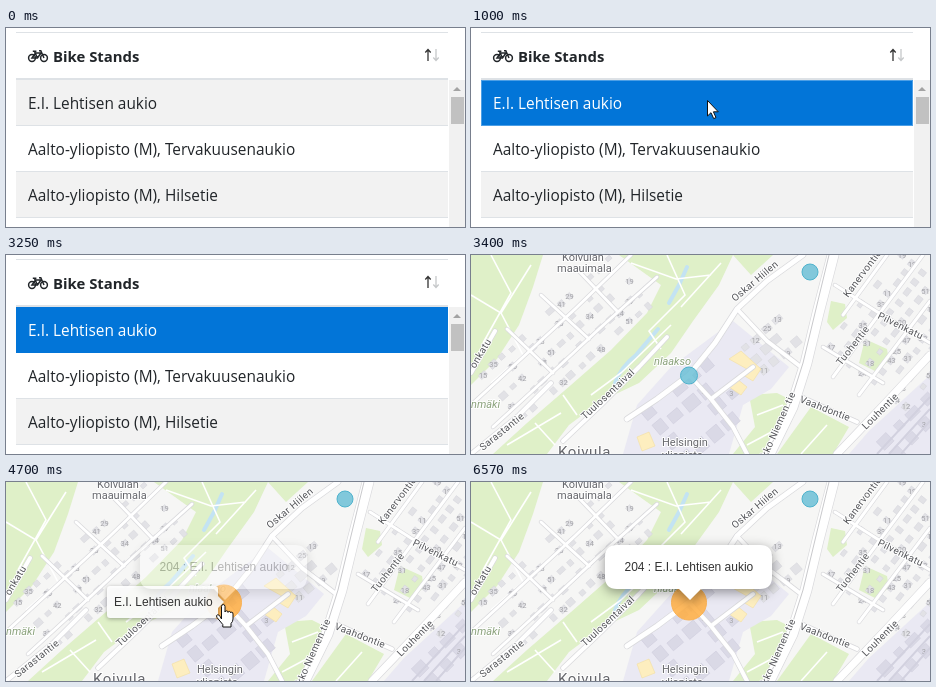
These frames come from a looping animation (459 by 199 pixels, 7270 ms). An HTML page:

```html
<!DOCTYPE html>
<html lang="fi">
<head>
<meta charset="utf-8">
<title>Bike stands</title>
<style>
html, body { margin: 0; width: 100%; height: 100%; overflow: hidden; background: #fff; }
svg { display: block; position: absolute; left: 0; top: 0; }
#list text { font: 15.4px "Open Sans", "Noto Sans", sans-serif; fill: #212529; }
#list .head { font-size: 14.9px; font-weight: 700; }
#picked text { fill: #fff; }
.green { fill: #dff0c8; }
.campus { fill: #eae9f3; }
.yellow { fill: #fdeebf; stroke: #f3dfa2; stroke-width: .6; }
.water { fill: none; stroke: #c3e3f3; stroke-width: 4; stroke-linecap: round; }
.trail { fill: none; stroke: #fff; stroke-width: 1.6; }
.casing, .road { fill: none; stroke-linejoin: round; stroke-linecap: round; }
.casing { stroke: #d9d9dc; }
.road { stroke: #fff; }
.house { fill: #e2e2e6; stroke: #d4d4da; stroke-width: .5; }
.block { fill: #dad9e6; stroke: #cbcada; stroke-width: .5; }
.num { font: 7.5px Roboto, sans-serif; fill: #a3a3a8; }
.street { font: 10px Roboto, Lato, sans-serif; letter-spacing: .3px; fill: #55565a; }
.place { font: 11px Roboto, Lato, sans-serif; fill: #66676c; }
.big { font-size: 15px; letter-spacing: .6px; }
.nature { font-style: italic; fill: #8ba27c; }
.street, .place { stroke: #fff; stroke-width: 2px; stroke-linejoin: round; paint-order: stroke; }
.tip text { font: 12px "Liberation Sans", Arial, sans-serif; fill: #333; }
#label { filter: drop-shadow(0 1px 2px rgba(0,0,0,.35)); }
#popup { filter: drop-shadow(0 3px 6px rgba(0,0,0,.4)); }
</style>
</head>
<body>
<svg width="459" height="199" viewBox="0 0 459 199">
  <g id="list">
    <rect width="459" height="199" fill="#fff"/>
    <path d="M10 52h432v45H10zM10 144h432v45H10z" fill="#f2f2f2"/>
    <path d="M10 4.5h432M10 97.5h432M10 143.5h432M10 189.5h432" stroke="#dee2e6"/>
    <path d="M10 51h432" stroke="#dee2e6" stroke-width="2"/>
    <g fill="none" stroke="#212529" stroke-width="1.5">
      <circle cx="26" cy="30" r="3.4"/><circle cx="38" cy="30" r="3.4"/>
      <path d="M26 30l3.5-5h5.5l-3.5 5zM33 22.8h1.8L38 30M31.5 30l-3-6.5M26.8 23.3h3.6"/>
    </g>
    <text class="head" x="47" y="34">Bike Stands</text>
    <g fill="none" stroke-width="1.3">
      <path d="M422 33V21.5M419.3 24.5l2.7-3 2.7 3" stroke="#333"/>
      <path d="M430 21v11.5M427.3 29.5l2.7 3 2.7-3" stroke="#c6c8ca"/>
    </g>
    <text id="first" x="22" y="81">E.I. Lehtisen aukio</text>
    <text x="22" y="127">Aalto-yliopisto (M), Tervakuusenaukio</text>
    <text x="22" y="173">Aalto-yliopisto (M), Hilsetie</text>
    <g id="picked">
      <rect x="10" y="52" width="432" height="46" fill="#0275d8"/>
      <rect id="focus" x="10.5" y="52.5" width="431" height="45" fill="none" stroke="#4c9fe6"/>
      <text x="22" y="81">E.I. Lehtisen aukio</text>
    </g>
    <path d="M443 52h16v147h-16z" fill="#f1f1f1"/>
    <path d="M447 63l4-4 4 4z" fill="#a3a3a3"/>
    <path d="M445 69h13v27h-13z" fill="#c1c1c1"/>
  </g>

  <g id="map">
    <rect width="459" height="199" fill="#f6f6f5"/>
    <g class="green">
      <path d="M0 0H72L62 32 48 70 26 104 0 130z"/>
      <path d="M148 0H262L248 30 222 66 200 98 168 128 130 146 98 170 76 199H22L56 168 100 130 140 95 176 58 190 30z"/>
      <path d="M278 140L306 138 322 146 304 186 290 199 262 199 284 172z"/>
      <path d="M340 152L378 172 362 199H306z"/>
      <path d="M360 46l14 3 2 14-14 12-6-8zM394 84l22 10 2 12-14 10-16-8zM262 0h40l-22 20z"/>
    </g>
    <path class="campus" d="M200 112L262 66 318 112 300 134 272 150 258 199H152L166 150z"/>
    <path class="campus" d="M459 120L398 176 378 199H459z"/>
    <path class="water" d="M144 128q6-16 21-28l22-26M198 48l10-18 8-18"/>
    <path class="trail" d="M0 40L30 58 52 100 20 128M20 0L40 38 12 88M60 10L30 58M160 8L205 24 240 20M196 0L214 40 178 76 190 94M250 8L210 52M120 140L150 118 200 70M84 190L64 168M106 160L92 140M286 160L312 150M276 190L306 174M330 199L356 170M36 190L90 158"/>
    <g id="houses"></g>
    <g class="yellow">
      <path d="M258 104l12-8 20 18-8 12-10-6 4-6zM266 124l10 8-6 8-12-8zM166 182l12-5 6 14-13 5z"/>
    </g>
    <g id="roads"></g>
    <path d="M459 142L406 199M459 154L418 199M459 166L430 199" stroke="#d2d1df" stroke-width="2"/>
    <path d="M358 0L344 58 332 108 318 152 296 199" fill="none" stroke="#c9c9cc"/>
    <g id="names"></g>
    <circle cx="339" cy="17" r="8" fill="#6cc0d6" stroke="#4fb3cd" fill-opacity=".85"/>
    <circle id="stand" cx="218" cy="120.5"/>
    <g id="label" class="tip">
      <path d="M104 104H209q3 0 3 3v7l6 6-6 6v7q0 3-3 3H104q-3 0-3-3V107q0-3 3-3z" fill="#fff" fill-opacity=".92"/>
      <text x="108" y="124">E.I. Lehtisen aukio</text>
    </g>
    <g id="popup" class="tip">
      <path d="M146 63H289q12 0 12 12V95q0 12-12 12H230L219 118 208 107H146q-12 0-12-12V75q0-12 12-12z" fill="#fff"/>
      <text x="153.5" y="89">204 : E.I. Lehtisen aukio</text>
    </g>
  </g>

  <path id="arrow" d="M.5 .5V16L4 12.7 6.7 18.6 9 17.6 6.4 11.8H11.3z" fill="#fff" stroke="#111"/>
  <path id="hand" d="M5.5 15V2.5q0-2 1.7-2t1.8 2V8q.3-1.2 1.6-1.2T12 8.4q.3-1 1.4-1t1.4 1.5q.3-.8 1-.8 1.2 0 1.2 2V15q0 2.5-2 4.5V23H6.8V20.5L1 13.5q-1.2-2 .3-2.7 1.5-.5 2.7 1.6z" fill="#fff" stroke="#111"/>
</svg>
<script>
const LOOP = 7270;
const $ = id => document.getElementById(id);

function add(parent, tag, attrs, text) {
  const el = document.createElementNS("http://www.w3.org/2000/svg", tag);
  for (const k in attrs) el.setAttribute(k, attrs[k]);
  if (text) el.textContent = text;
  $(parent).append(el);
}

let seed = 4211;
const rand = () => (seed = seed * 16807 % 2147483647) / 2147483647;

// A turned grid of jittered buildings, some with a house number
function quarter(x, y, deg, cols, rows, dx, dy, size, kind) {
  const a = deg * Math.PI / 180, cos = Math.cos(a), sin = Math.sin(a);
  for (let r = 0; r < rows; r++) for (let c = 0; c < cols; c++) {
    const u = c * dx + rand() * 3, v = r * dy + rand() * 3;
    const px = x + u * cos - v * sin, py = y + u * sin + v * cos;
    const w = size * (.7 + rand() * .5), h = size * (.6 + rand() * .4);
    const skip = rand(), number = rand();
    if (skip < .14) continue;
    const turn = `translate(${px.toFixed(1)} ${py.toFixed(1)}) rotate(${deg})`;
    add("houses", "rect", { class: kind, x: -w / 2, y: -h / 2, width: w, height: h, transform: turn });
    if (number < .38) {
      const n = kind === "block" ? 1 + Math.floor(rand() * 11) : 11 + Math.floor(rand() * 42);
      add("houses", "text", { class: "num", x: px - 4, y: py + 3 }, String(n));
    }
  }
}
quarter(10, 118, -42, 14, 5, 13, 15, 7, "house");
quarter(356, 92, -52, 10, 8, 13, 14, 7, "house");
quarter(272, 92, -40, 4, 3, 14, 15, 9, "house");
quarter(176, 158, -40, 5, 4, 19, 19, 14, "block");
quarter(412, 186, -45, 4, 2, 20, 18, 12, "block");

const roads = [
  [3, "M0 150L50 104 104 54 160 0"],
  [3, "M22 172L70 128 128 74 186 22"],
  [4, "M0 199L48 160 80 128M0 118L24 76"],
  [3, "M36 74L82 118M70 40L118 84M104 12L146 56"],
  [4, "M92 186L130 150 168 112 196 82"],
  [5, "M332 0L296 26 266 54 244 88 218 120 186 144 156 164"],
  [4, "M218 120L240 144 262 172 276 199M266 54L296 86 330 112M240 144L282 112"],
  [3, "M372 60L416 0M362 122L400 70 452 0M388 140L459 46M364 30L408 58 459 88M352 92L412 128"],
  [4, "M324 139L352 152 386 167"],
  [7, "M459 100L420 142 388 176 366 199"],
  [11, "M362 0L347 58 335 108 321 152 298 199"]
];
for (const [w, d] of roads) add("roads", "path", { class: "casing", d, "stroke-width": w + 1.4 });
for (const [w, d] of roads) add("roads", "path", { class: "road", d, "stroke-width": w });

const names = [
  ["street", "Oskar Hiilen", 264, 47, -40],
  ["street", "Kanervontie", 377, 43, -53],
  ["street", "Pilvenkatu", 406, 63, 26],
  ["street", "Tuohentie", 370, 111, -52],
  ["street", "Vaahdontie", 328, 147, 21],
  ["street", "Louhentie", 395, 175, -45],
  ["street", "Sarastantie", 12, 196, -39],
  ["street", "Tuulosentaival", 114, 165, -43],
  ["street", "kko Niemen tie", 296, 203, -66],
  ["street", "onkatu", 4, 114, -59],
  ["place nature", "nmäki", 0, 153, 0],
  ["place nature", "nlaakso", 183, 110, 0],
  ["place", "Koivulan", 91, 6, 0],
  ["place", "maauimala", 86, 17, 0],
  ["place", "Helsingin", 191, 191, 0],
  ["place", "yliopisto", 191, 204, 0],
  ["place big", "Koivula", 87, 202, 0]
];
for (const [cls, text, x, y, deg] of names)
  add("names", "text", { class: cls, transform: `translate(${x} ${y}) rotate(${deg})` }, text);

// Pointer legs: start, end, picture changes, from x y, to x y, easing power, hides at the end
const legs = [
  [230, 610, 6, 335, 171, 236, 72, .7],
  [1470, 1470, 1, 236, 73, 236, 73, 1],
  [2080, 2700, 9, 240, 76, 406, 188, 1.4, true],
  [3550, 4240, 10, 288, 186, 206, 122, .7],
  [4320, 4320, 1, 210, 122, 210, 122, 1],
  [5100, 5250, 3, 212, 123, 216, 125, 1],
  [5420, 6110, 10, 216, 125, 324, 153, 3],
  [6180, 6570, 6, 334, 157, 401, 190, 1, true]
];

// Share of the steps done by time t, 1-based count
const stepAt = (t, t0, t1, n) =>
  t < t0 ? 0 : n === 1 ? 1 : Math.min(n, 1 + Math.floor((t - t0) / ((t1 - t0) / (n - 1)) + 1e-6));

function pointer(t) {
  const leg = legs.filter(l => t >= l[0]).pop();
  if (!leg) return null;
  const [t0, t1, n, x0, y0, x1, y1, power, hides] = leg;
  const k = stepAt(t, t0, t1, n);
  if (hides && k === n) return null;
  let p;
  if (n === 1) p = 1;
  else if (power === 3) p = (k / n) ** 3;
  else p = ((k - 1) / (n - 1 - (hides ? 1 : 0))) ** power;
  return [Math.round(x0 + (x1 - x0) * p), Math.round(y0 + (y1 - y0) * p)];
}

const show = (id, on) => $(id).style.display = on ? "" : "none";

function draw(t) {
  const onMap = t >= 3400, chosen = t >= 4700;
  show("list", !onMap);
  show("map", onMap);
  $("picked").style.opacity = stepAt(t, 840, 1000, 3) / 3;
  show("focus", t < 3250);

  const radius = chosen ? 17.5 : 8.5;
  const stand = $("stand");
  stand.setAttribute("r", radius);
  stand.setAttribute("fill", chosen ? "#ffae42" : "#6cc0d6");
  stand.setAttribute("stroke", chosen ? "#f9b256" : "#4fb3cd");
  stand.setAttribute("fill-opacity", .85);
  $("popup").style.opacity = [0, .32, .62, .86, 1][stepAt(t, 4700, 4930, 4)];

  const at = pointer(t);
  const over = onMap && at && Math.hypot(at[0] + 6 - 218, at[1] - 120) <= radius + .6;
  show("label", over);
  show("hand", over);
  show("arrow", at && !over);
  if (at) $(over ? "hand" : "arrow").setAttribute("transform", `translate(${at})`);
}

const start = performance.now();
function tick() {
  draw((performance.now() - start) % LOOP);
  requestAnimationFrame(tick);
}
tick();
</script>
</body>
</html>
```
